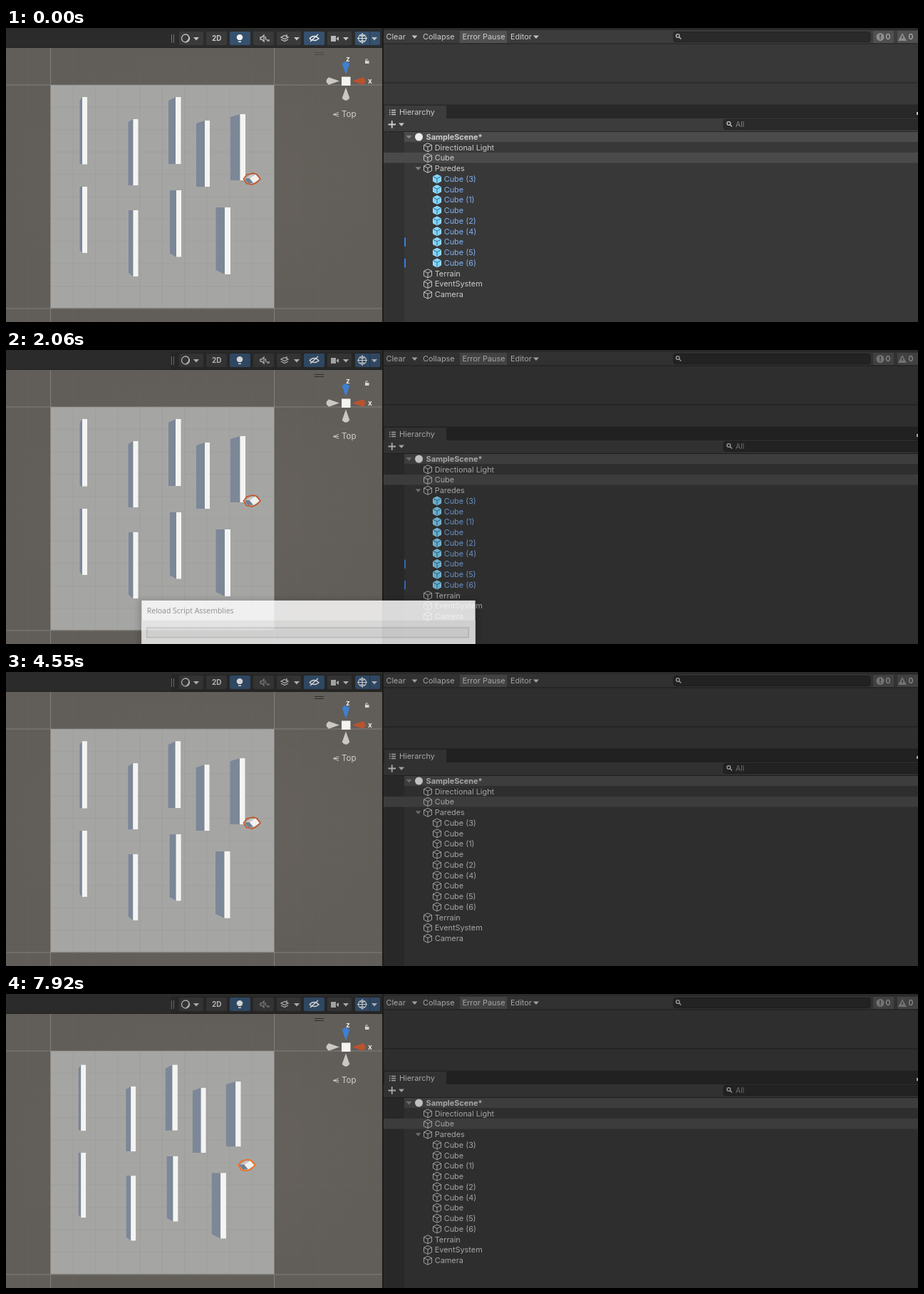
Animation of 1280x413 px, one loop 7.99 s. Source, as an HTML page:

```html
<!DOCTYPE html>
<html lang="en">
<head>
<meta charset="utf-8">
<title>Editor play mode</title>
<style>
  html, body { margin: 0; width: 100%; height: 100%; overflow: hidden; background: #383838; }
  svg { display: block; width: 100%; height: 100%; }
  text { font: 10.9px Inter, sans-serif; fill: #cbcbcb; white-space: pre; }
  .bold { font-weight: 700; }
  .dialog text { font: 10.6px "Open Sans", sans-serif; fill: #8c8c90; }
  .prefab text { fill: #80b0f2; }
  .prefab .box { fill: #7fd4fb; stroke: #a4e2ff; }
  .prefab .seam { stroke: #2f6d92; }
  .box, .seam { fill: none; stroke: #c6c6c6; stroke-width: 1; stroke-linejoin: round; }
  .line { fill: none; stroke: #c4c4c4; stroke-width: 1.3; }
</style>
</head>
<body>
<svg id="stage" viewBox="0 0 1280 413" preserveAspectRatio="none"></svg>
<script>
const LOOP = 7990;
const rect = (x, y, w, h, fill, more = '') =>
  `<rect x="${x}" y="${y}" width="${w}" height="${h}" fill="${fill}" ${more}/>`;
const poly = (points, fill, more = '') => `<polygon points="${points}" fill="${fill}" ${more}/>`;
const path = (d, more = 'class="line"') => `<path d="${d}" ${more}/>`;
const label = (x, y, text, more = '') => `<text x="${x}" y="${y + 3.9}" ${more}>${text}</text>`;
const caret = (x, y, fill = '#c4c4c4') => poly(`${x - 4},${y - 2} ${x + 4},${y - 2} ${x},${y + 2.5}`, fill);
const lens = (x, y) => path(`M${x + 1} ${y}l3 3M${x - 3} ${y - 1.5}a2.4 2.4 0 1 0 4.8 0a2.4 2.4 0 1 0-4.8 0`);

// Scene view
function ground() {
  let s = rect(0, 28, 528, 385, 'url(#floor)') + rect(62.5, 80, 313.5, 313.5, '#a5a6a4');
  for (let i = -2; i < 15; i++) {
    const x = 62.5 + i * 31.4, y = 80 + i * 31.4;
    const edge = i === 0 || i === 10;
    const color = edge ? '#8b8883' : '#777';
    const alpha = edge ? 0.8 : 0.13;
    if (x > 0) s += rect(x - 0.5, 28, 1, 385, color, `opacity="${alpha}"`);
    if (y > 28 && y < 413) s += rect(0, y - 0.5, 528, 1, color, `opacity="${alpha}"`);
  }
  return s;
}

// left, ridge, right, top, bottom, slant at top, slant at bottom
const walls = [
  [103.5, 107, 114, 97, 191.5, 5, 1], [171.5, 178.5, 185.5, 128, 221, 4, 0],
  [228, 238, 245.5, 97, 191, 5, 0], [267, 279, 286, 130, 223, 4, 0],
  [315, 328.5, 336, 121, 214, 4, 0], [103.5, 107, 114, 223, 316, 0, 4],
  [172, 178.5, 185.5, 256, 349, 0, 5], [230, 239, 246, 228, 321.5, 0, 5],
  [294.5, 307, 315, 252, 346, 0, 6]
];
const wall = ([l, m, r, t, b, st, sb]) =>
  poly(`${l},${t + st} ${m},${t} ${m},${b} ${l},${b - sb}`, '#7c8798') +
  rect(m, t, r - m, b - t, '#f4f4f2');

const player =
  poly('335,212 342,208 348,217 340,218', '#6f7f92') +
  poly('336,211 344,206 348,206 341,211', '#c9cccd') +
  poly('341.5,211 350,205.5 356,212 347.5,218', '#f1f1ef') +
  poly('333.5,212 338,206 347,204 352,205.5 357,212 352,217 345.5,220 337.5,218.5', 'none',
       'id="outline" stroke-width="1.7" stroke-linejoin="round"');

function gizmo() {
  const cone = (angle, fill) =>
    `<path transform="translate(477 74.5) rotate(${angle})" fill="${fill}" d="M0-9L-5.3-24Q0-31 5.3-24Z"/>`;
  return cone(0, '#3f7fd0') + cone(90, '#b9532f') + cone(180, '#c9c8c5') + cone(270, '#c9c8c5') +
    rect(471, 68.5, 12.5, 12.5, '#f3f3f1') +
    label(477, 43, 'z', 'class="bold" style="font-size:10px;fill:#e8e8e8"') +
    label(508, 74, 'x', 'class="bold" style="font-size:10px;fill:#e8e8e8"') +
    rect(504, 46, 5.5, 4, '#d5d4d2') + path('M505 46v-2h3', 'fill="none" stroke="#d5d4d2"') +
    path('M467 118.5l-8 3l8 3M459 121.5h8', 'fill="none" stroke="#c5c3bf"') +
    label(471, 121.5, 'Top', 'style="font-size:11.5px;fill:#d2d0cc"') +
    `<g id="grip">${rect(433, 34, 13, 1, '#2d2b29')}${rect(433, 37, 13, 1, '#2d2b29')}</g>`;
}

function sceneBar() {
  const button = (x, w, on) => rect(x, 5, w, 19, on ? '#36516e' : '#3a3a3a', 'rx="2"');
  return rect(0, 0, 528, 28, '#2b2b2b') + rect(0, 27, 528, 1, '#222') +
    rect(232, 9, 1, 12, '#777') + rect(235, 9, 1, 12, '#777') +
    button(243, 34) + button(281, 29) + button(314, 29, 1) + button(347, 29) +
    button(380, 34) + button(418, 29, 1) + button(451, 34) + button(490, 35, 1) +
    path('M246.5 14.5a5.5 5.5 0 1 0 11 0a5.5 5.5 0 1 0-11 0') +
    path('M254 9.5q5 5-2 10q6 0 5.5-5q-.5-4-3.500-5', 'fill="#c4c4c4"') + caret(267, 15) +
    label(289, 14.5, '2D', 'class="bold" style="font-size:10px"') +
    path('M326 17q-2.500-2-2.300-4a4.300 4 0 0 1 8.600 0q.2 2-2.300 4zM326 18.500h4v1.500h-4z', 'fill="#f0f0f0"') +
    `<g id="sound">${path('M357 13h2l3-3v9l-3-3h-2zM364 12l1 5M367 16v3M369 16v3')}</g>` +
    path('M386 13l5-2.500l5 2.500l-5 2.500zM386 16l5 2.500l5-2.500M394 9v4') + caret(408, 15) +
    path('M426 15q6-7 13 0q-6 5-13 0M427 19l11-10', 'fill="none" stroke="#eee" stroke-width="1.4"') +
    rect(456, 11, 7, 8, '#b8b8b8') + poly('464,14 467,12 467,18 464,16', '#b8b8b8') + caret(477, 15) +
    path('M494.500 14.500a5.500 5.500 0 1 0 11 0a5.500 5.500 0 1 0-11 0M500 7v15M493 14.500h14M496 10q4 3 8 0M496 19q4-3 8 0',
         'fill="none" stroke="#e6e6e6" stroke-width="1.100"') +
    rect(510, 5, 1, 19, '#263a50') + caret(517, 15);
}

// Console and hierarchy
function consolePanel() {
  return rect(528, 0, 752, 413, '#383838') + rect(528, 0, 2, 413, '#1c1c1c') +
    rect(530, 0, 750, 3, '#2a2a2a') + rect(530, 3, 750, 19, '#3c3c3c') +
    rect(530, 21.5, 750, 1, '#222') + rect(530, 76.5, 750, 1, '#222') +
    rect(637, 4, 66, 17, '#515151') +
    label(533.5, 12.5, 'Clear') + caret(573.5, 12.5) + label(585, 12.5, 'Collapse') +
    label(640.5, 12.5, 'Error Pause') + label(708, 12.5, 'Editor') + caret(744, 12.5) +
    rect(937, 5.500, 276, 14, '#2a2a2a', 'rx="3" stroke="#222"') + lens(943.500, 12.500) +
    rect(1217, 4, 29, 17, '#505050') + rect(1251, 4, 29, 17, '#505050') +
    '<circle cx="1227" cy="12.500" r="5.500" fill="#8e8e8e"/>' + rect(1226.300, 9, 1.500, 4.500, '#444') +
    rect(1226.300, 14.500, 1.500, 1.500, '#444') + label(1234.500, 12.500, '0') +
    poly('1258,7 1264,18 1252,18', '#8e8e8e') + rect(1257.300, 11, 1.500, 4, '#444') + label(1266.500, 12.500, '0');
}

const rowY = i => 153 + 14.75 * i;
const cubeIcon = (x, y) =>
  `<path class="box" d="M${x} ${y - 6}l5.500 2.700v6.600l-5.500 2.700l-5.500-2.700v-6.600z"/>` +
  `<path class="seam" d="M${x - 5.5} ${y - 3.3}l5.500 2.700l5.500-2.700M${x} ${y - 0.6}v6.500"/>`;
const entry = (x, i, text) => cubeIcon(x, rowY(i)) + label(x + 9.7, rowY(i), text);

function hierarchy() {
  let s = rect(530, 107.500, 750, 20, '#282828') + rect(531, 109, 87, 19, '#3c3c3c') +
    rect(530, 127, 750, 18.500, '#3c3c3c') + rect(530, 145, 750, 1, '#252525') +
    path('M538 115.500h1.500M541 115.500h6M538 118.500h1.500M541 118.500h6M538 121.500h1.500M541 121.500h6') +
    label(552, 118.5, 'Hierarchy') + rect(1278, 118, 2, 4, '#ccc') +
    path('M536.500 135.500h10.500M541.700 130.300v10.500', 'stroke="#d0d0d0" stroke-width="1.800"') + caret(555, 135.5) +
    rect(1007, 128.500, 280, 14, '#2a2a2a', 'rx="3" stroke="#222"') + lens(1015, 135.5) +
    label(1024, 135.5, 'All', 'style="fill:#858585;font-size:10.4px"') +
    rect(530, 146, 29, 267, '#313131') +
    rect(559, 146, 721, 14, '#4b4b4b') + rect(530, 175, 750, 14.5, '#4a4a4a') +
    caret(565.5, rowY(0), '#858585') + caret(578.5, rowY(3), '#858585') +
    `<circle cx="579.500" cy="${rowY(0)}" r="5.500" fill="#ececec"/>` +
    label(589.5, rowY(0), 'SampleScene*', 'class="bold"');
  ['Directional Light', 'Cube', 'Paredes'].forEach((name, i) => s += entry(592, i + 1, name));
  ['Terrain', 'EventSystem', 'Camera'].forEach((name, i) => s += entry(592, i + 13, name));
  s += '<g id="prefabs" class="prefab">';
  ['Cube (3)', 'Cube', 'Cube (1)', 'Cube', 'Cube (2)', 'Cube (4)', 'Cube', 'Cube (5)', 'Cube (6)']
    .forEach((name, i) => s += entry(605, i + 4, name));
  const mark = i => rect(559, rowY(i) - 6, 2, 12.5, '#3b7edb');
  return s + `</g><g id="marks">${mark(10)}${mark(12)}</g>`;
}

const dialog =
  rect(182, 348, 485, 90, '#000', 'opacity=".13" rx="5" filter="url(#soft)"') +
  rect(188, 351.5, 473, 80, '#fff') + rect(188, 380, 473, 50, '#f0f0f0') +
  rect(195.5, 390, 456, 14, '#e6e6e6', 'stroke="#bcbcbc"') +
  '<text id="caption" x="195.500" y="370"></text>';

const stage = document.getElementById('stage');
stage.innerHTML = `<defs>
    <radialGradient id="floor"><stop offset="0" stop-color="#68635d"/><stop offset="1" stop-color="#615d58"/></radialGradient>
    <filter id="soft"><feGaussianBlur stdDeviation="3"/></filter>
  </defs>${ground()}
  <g id="walls">${walls.map(wall).join('')}</g><g id="player">${player}</g>
  ${gizmo()}${sceneBar()}${consolePanel()}${hierarchy()}
  <g id="tint">${rect(232, 3, 296, 25, '#000', 'opacity=".12"')}${rect(530, 3, 750, 410, '#000', 'opacity=".19"')}</g>
  <g id="dialog" class="dialog">${dialog}</g>`;

const $ = id => document.getElementById(id);
const parts = Object.fromEntries(
  ['walls', 'player', 'outline', 'grip', 'sound', 'prefabs', 'marks', 'tint', 'dialog', 'caption']
    .map(id => [id, $(id)]));

// time, opacity, scale
const dialogSteps = [[0, 0, 1], [1920, 0.15, 0.94], [1990, 0.5, 0.97], [2060, 0.83, 0.99],
  [2130, 0.96, 0.998], [2200, 1, 1], [3530, 0.6, 0.98], [3600, 0.2, 0.95], [3670, 0, 1]];
// time, x, y
const playerPath = [[0, 0, 0], [6960, 0, 0], [7240, 0, 14.5], [7370, 0, 14.5],
  [7580, 0, 28.5], [7780, 0, 28.5], [7920, -11.5, 28.5], [LOOP, -11.5, 28.5]];

const held = (steps, t) => steps.filter(s => s[0] <= t).pop();
function along(points, t) {
  const i = points.findIndex(p => p[0] > t);
  const a = points[i - 1], b = points[i], k = (t - a[0]) / (b[0] - a[0]);
  return [a[1] + (b[1] - a[1]) * k, a[2] + (b[2] - a[2]) * k];
}
const show = (el, on) => el.setAttribute('visibility', on ? 'visible' : 'hidden');
const scaleAbout = (x, y, s) => `translate(${x} ${y}) scale(${s}) translate(${-x} ${-y})`;

function draw(t) {
  const loaded = t >= 4070;
  show(parts.tint, t >= 1720);
  parts.grip.setAttribute('opacity', t >= 1720 ? 1 : 0.4);
  parts.sound.setAttribute('opacity', loaded ? 0.55 : 1);
  parts.prefabs.setAttribute('class', loaded ? '' : 'prefab');
  show(parts.marks, !loaded);

  const [, alpha, scale] = held(dialogSteps, t);
  parts.dialog.setAttribute('opacity', alpha);
  parts.dialog.setAttribute('transform', scaleAbout(424.5, 390, scale));
  parts.caption.textContent = t < 3400 ? 'Reload Script Assemblies' : 'Hold on...';

  const shrink = Math.min(1, Math.max(0, (t - 4070) / 1950)) ** 1.8;
  parts.walls.setAttribute('transform', scaleAbout(16, 222, 1 - 0.0203 * shrink));

  // the player is redrawn about every 70 ms
  const [x, y] = along(playerPath, t >= 7030 ? 7030 + Math.floor((t - 7030) / 70 + 0.01) * 70 : 0);
  parts.player.setAttribute('transform', `translate(${x} ${y})`);
  parts.outline.setAttribute('stroke', t >= 7030 ? '#ff6a10' : '#c95224');
}

const start = performance.now();
function tick() {
  draw((performance.now() - start) % LOOP);
  requestAnimationFrame(tick);
}
tick();
</script>
</body>
</html>
```
